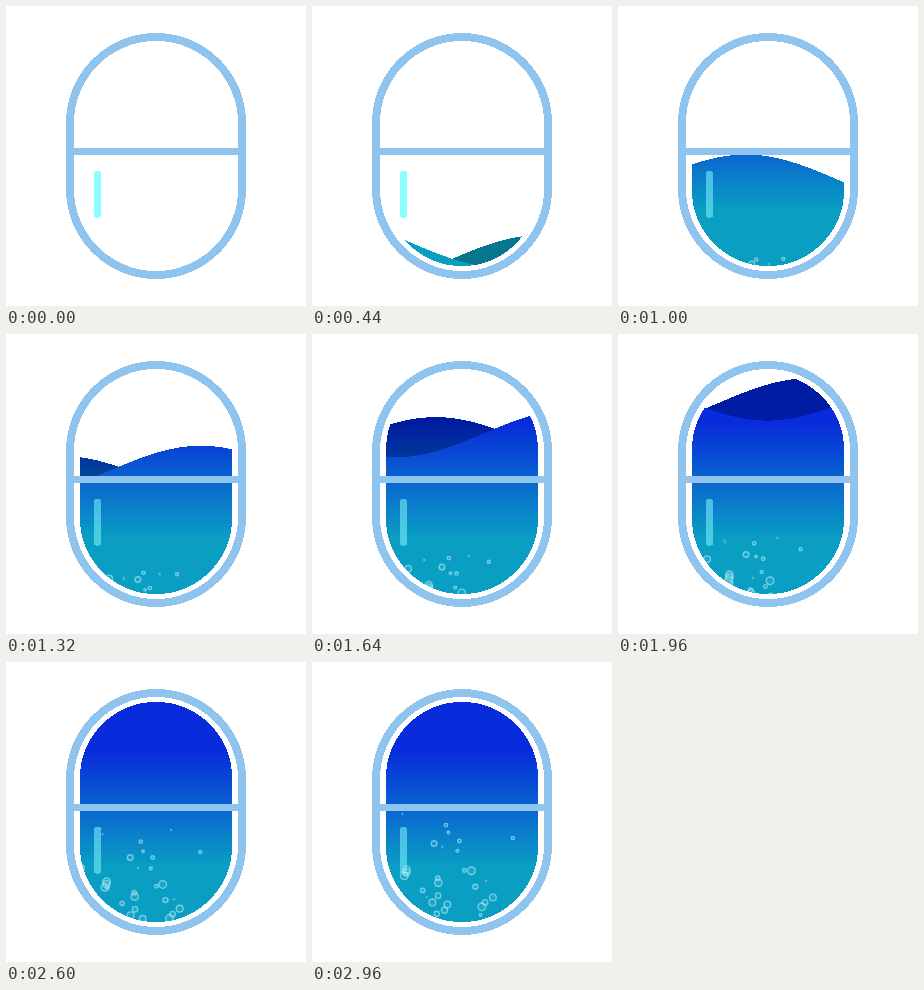
An HTML page that plays this animation: 300 by 300 pixels, repeating every 3 s.

```html
<!DOCTYPE html>
<html lang="en">
<head>
<meta charset="utf-8">
<title>Filling capsule</title>
<style>
html, body { margin: 0; width: 100%; height: 100%; overflow: hidden; background: #fff; }
svg { display: block; width: 100vw; height: 100vh; }
.crisp { shape-rendering: crispEdges; }
.glass { fill: none; stroke: #8ec4ee; }
.shine { fill: none; stroke: #8cffff; stroke-width: 7.5; stroke-linecap: round; }
#bubbles { fill: #9be6f2; fill-opacity: .12; stroke: #a4e6f2; stroke-opacity: .65; }
</style>
</head>
<body>
<svg viewBox="0 0 300 300">
  <defs>
    <linearGradient id="deep" gradientUnits="userSpaceOnUse" x1="0" y1="88" x2="0" y2="204">
      <stop offset="0" stop-color="#001ca2"/><stop offset="1" stop-color="#06758e"/>
    </linearGradient>
    <linearGradient id="water" gradientUnits="userSpaceOnUse" x1="0" y1="88" x2="0" y2="204">
      <stop offset="0" stop-color="#082bdb"/><stop offset="1" stop-color="#0a9ec3"/>
    </linearGradient>
  </defs>
  <path class="shine crisp" d="M91.5 168.5V208"/>
  <path id="back" class="crisp" fill="url(#deep)"/>
  <path id="front" class="crisp" fill="url(#water)"/>
  <path class="shine crisp" d="M91.5 168.5V208" opacity=".5"/>
  <g id="bubbles"></g>
  <!-- white surround that leaves only the inner capsule visible -->
  <rect class="crisp" x="24" y="-10" width="252" height="320" rx="126" fill="none" stroke="#fff" stroke-width="100"/>
  <path class="glass crisp" d="M66 145.5H234" stroke-width="7"/>
  <rect class="glass crisp" x="64" y="31" width="172" height="238" rx="86" stroke-width="8"/>
</svg>
<script>
const LOOP = 3000, STEP = 40, AMP = 24.2, COUNT = 32;
const byId = id => document.getElementById(id);
const back = byId('back'), front = byId('front');

let seed = 29;
function random() {
  seed = (seed * 16807) % 2147483647;
  return seed / 2147483647;
}

// Bubbles leave the bottom one after another and fan out; small ones rise faster.
const bubbles = Array.from({ length: COUNT }, (_, i) => {
  const side = random() * 2 - 1, size = random();
  const r = 0.5 + 3.4 * size;
  const el = document.createElementNS('http://www.w3.org/2000/svg', 'circle');
  el.setAttribute('r', r);
  el.setAttribute('stroke-width', r < 1 ? 0.7 : 1.4);
  byId('bubbles').append(el);
  return {
    el,
    birth: 600 + 2100 * i / COUNT,
    x: 141 + 22 * side,
    drift: 0.022 * side,
    rise: 0.042 - 0.012 * Math.abs(side) + 0.03 * (1 - size) ** 4
  };
});

// One crest per 360 px, so a pixel equals a degree.
function wave(crest, level) {
  let d = 'M70 300';
  for (let x = 70; x <= 230; x += 2) {
    const y = level - AMP * Math.cos((x - crest) * Math.PI / 180);
    d += `L${x} ${y.toFixed(2)}`;
  }
  return d + 'L230 300Z';
}

function draw(t) {
  const dt = t - 1320;
  back.setAttribute('d', wave(56 + 0.212 * dt, 146.2 - 0.1215 * dt));
  front.setAttribute('d', wave(195 + 0.21 * dt, 136 - 0.115 * dt));
  for (const b of bubbles) {
    const age = t - b.birth;
    b.el.setAttribute('cx', b.x + b.drift * age);
    b.el.setAttribute('cy', 266 - b.rise * age);
  }
}

const start = performance.now();
function tick() {
  const t = (performance.now() - start) % LOOP;
  draw(Math.floor(t / STEP) * STEP);
  requestAnimationFrame(tick);
}
tick();
</script>
</body>
</html>
```
